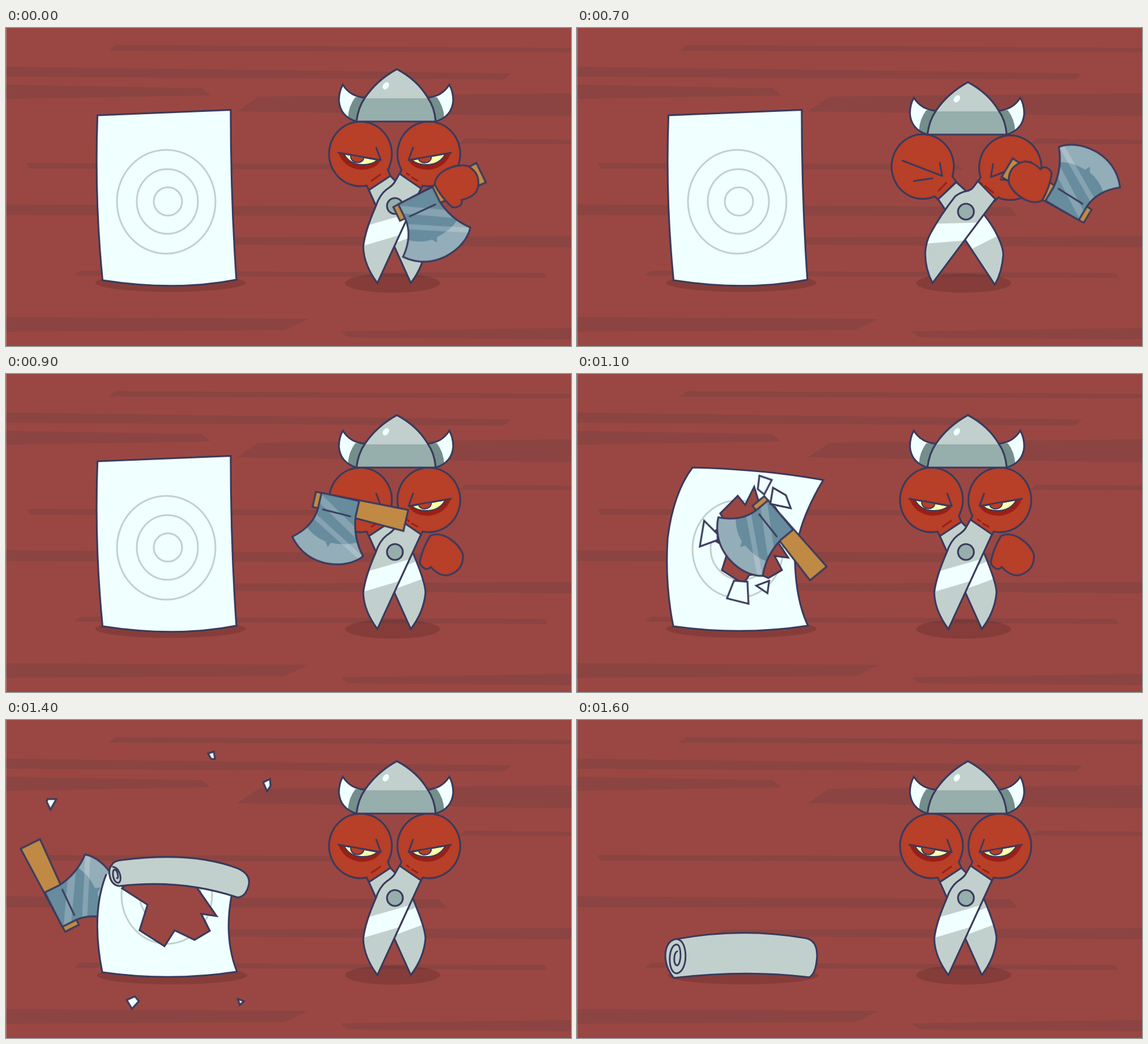
An HTML page without scripts for the animation above (2600 ms loop, 998x561 px).

```html
<!DOCTYPE html>
<html lang="en">
<head>
<meta charset="utf-8">
<title>Axe throw</title>
<style>
html, body { margin: 0; width: 100%; height: 100%; overflow: hidden; background: #9a4743; }
svg.stage { display: block; width: 100vw; height: 100vh; }

.ink { stroke: #3a3a5c; stroke-width: 3.2; }
.thin { stroke: #3a3a5c; stroke-width: 2.2; }
.line { fill: none; stroke: #3a3a5c; stroke-width: 3; stroke-linecap: round; stroke-linejoin: round; }
.freckle { fill: none; stroke: #9a1f16; stroke-width: 3; }
.red { fill: #b83f28; }
.steel { fill: #c1d0cd; }
.dull { fill: #96aeac; }
.paper { fill: #f0ffff; }
.wood { fill: #c08a45; }
.floor { fill: #9a4743; }
.stripe { fill: #8b4442; }
.shadow { fill: #000; opacity: .13; }
.rings { fill: none; stroke: #c1d0cd; stroke-width: 3; }

.anim { animation: 2.6s step-end infinite; }

/* Fighter */
.calm { animation-name: calm; }
.strain { animation-name: strain; visibility: hidden; }
.helmet { animation-name: helmet; }
@keyframes calm {
  0% { visibility: visible; } 23.07% { visibility: hidden; } 34.61% { visibility: visible; }
}
@keyframes strain {
  0% { visibility: hidden; } 23.07% { visibility: visible; } 34.61% { visibility: hidden; }
}
@keyframes helmet {
  0% { transform: none; } 23.07% { transform: translateY(23px); } 34.61% { transform: none; }
}

/* Weapon */
.axe { animation-name: axe; }
.glove { animation-name: glove; }
.axe-out { animation-name: axe-out; visibility: hidden; }
@keyframes axe {
  0% { transform: translate(690px, 328px) rotate(-26deg); visibility: visible; }
  23.07% { transform: translate(894px, 331px) rotate(-150.3deg); }
  26.92% { transform: translate(902px, 332px) rotate(-149deg); }
  30.76% { transform: translate(690.5px, 210.5px) rotate(52.3deg); }
  34.61% { transform: translate(544.5px, 221px) rotate(13deg); }
  38.46% { transform: translate(470px, 325px) rotate(-137deg); }
  42.3% { transform: translate(320.5px, 224px) rotate(50.4deg); }
  50%, 100% { visibility: hidden; }
}
@keyframes glove {
  0% { transform: translate(690px, 328px) rotate(-26deg); visibility: visible; }
  23.07% { transform: translate(894px, 331px) rotate(-150.3deg); }
  26.92% { transform: translate(902px, 332px) rotate(-149deg); }
  30.76% { transform: translate(690.5px, 210.5px) rotate(52.3deg); }
  34.61% { transform: translate(670px, 255px) rotate(33deg); visibility: visible; }
  46.15%, 100% { visibility: hidden; transform: translate(670px, 255px) rotate(33deg); }
}
@keyframes axe-out {
  0% { visibility: hidden; }
  50% { visibility: visible; transform: translate(150px, 311px) rotate(-35deg); }
  53.84% { visibility: visible; transform: translate(116.5px, 367.5px) rotate(-116.3deg); }
  57.69% { visibility: visible; transform: translate(20px, 175px) rotate(78deg); }
  61.53%, 100% { visibility: hidden; }
}

/* Paper */
.whole { animation-name: whole; }
.torn { animation-name: torn; visibility: hidden; }
.curl1 { animation-name: curl1; visibility: hidden; }
.curl2 { animation-name: curl2; visibility: hidden; }
.curl3 { animation-name: curl3; visibility: hidden; }
.rolled { animation-name: rolled; visibility: hidden; }
.paper-shadow { animation-name: paper-shadow; }
@keyframes whole { 0% { visibility: visible; } 42.3%, 100% { visibility: hidden; } }
@keyframes torn { 0% { visibility: hidden; } 42.3% { visibility: visible; } 50% { visibility: hidden; } }
@keyframes curl1 { 0% { visibility: hidden; } 50% { visibility: visible; } 53.84% { visibility: hidden; } }
@keyframes curl2 { 0% { visibility: hidden; } 53.84% { visibility: visible; } 57.69% { visibility: hidden; } }
@keyframes curl3 { 0% { visibility: hidden; } 57.69% { visibility: visible; } 61.53% { visibility: hidden; } }
@keyframes rolled { 0% { visibility: hidden; } 61.53%, 100% { visibility: visible; } }
@keyframes paper-shadow { 0% { transform: none; } 53.84%, 100% { transform: translate(3px, 1px); } }

/* Shards: --x, --y and --r give travel and turn */
.shard {
  animation-name: fly; visibility: hidden; vector-effect: non-scaling-stroke;
  transform-box: fill-box; transform-origin: center;
}
@keyframes fly {
  0% { visibility: hidden; }
  42.3% { visibility: visible; transform: translate(calc(var(--x) * -.15), calc(var(--y) * -.15)) scale(.95); }
  46.15% { visibility: visible; transform: none; }
  50% { visibility: visible; transform: translate(calc(var(--x) * .6), calc(var(--y) * .6)) rotate(calc(var(--r) * .5)) scale(.7); }
  53.84% { visibility: visible; transform: translate(var(--x), var(--y)) rotate(var(--r)) scale(.44); }
  57.69% { visibility: visible; transform: translate(calc(var(--x) * 1.3), calc(var(--y) * 1.3)) rotate(calc(var(--r) * 1.3)) scale(.25); }
  61.53%, 100% { visibility: hidden; }
}
</style>
</head>
<body>
<svg class="stage" viewBox="0 0 998 561" preserveAspectRatio="none">
<defs>
  <path id="blade" d="M10-14L78-15V13Q82 50 106.500 78.500C85 108 15 122-23 73Q8 48 10 15Z"/>
  <clipPath id="in-blade"><use href="#blade"/></clipPath>
  <g id="axe">
    <path class="wood ink" d="M0-13.5L166-19V19L0 13.5Z"/>
    <g clip-path="url(#in-blade)">
      <use href="#blade" fill="#94aeb9"/>
      <path fill="#668c9d" d="M-12 40Q8 64 36 68L42 77L46 68Q74 68 92 56L84-20H0Z"/>
      <path fill="none" stroke="#fff" stroke-opacity=".2" stroke-width="13" d="M-10-16L110 57"/>
      <path fill="none" stroke="#fff" stroke-opacity=".2" stroke-width="9" d="M-10 19L110 86"/>
    </g>
    <use href="#blade" class="ink" fill="none"/>
    <path class="line" d="M19 14L69 15"/>
  </g>

  <g id="horn">
    <path class="paper" d="M595 100Q588 112 588 128Q590 156 619 165L634 123Q608 121 595 100Z"/>
    <path fill="#748e8b" d="M617 122Q605 138 604 158L619 165L634 123Z"/>
    <path class="ink" fill="none" d="M595 100Q588 112 588 128Q590 156 619 165L634 123Q608 121 595 100Z"/>
  </g>

  <g id="calm-head">
    <path class="red ink" d="M674.500 250A55.5 57 0 1 0 637 278L641 286L679 261Z"/>
    <path fill="#9a1f16" d="M587 220L662 233Q654 250 626 250Q597 247 587 220Z"/>
    <path fill="#ffffae" class="thin" d="M597 222L656 233Q645 242 628 241Q606 240 597 222Z"/>
    <path class="line" d="M587 220L662 233L654 211"/>
  </g>
  <g id="strain-head">
    <path class="red ink" d="M663 262A55 57 0 1 0 632 297L638 303L670 271Z"/>
    <path class="line" d="M575 234L645 261L641 238M595 270L628 265"/>
  </g>

  <path id="calm-back" d="M641 286L679 261L690 272L719 316C730 342 741 370 741 386Q738 420 715 450Z"/>
  <path id="calm-front" d="M695 257L733 283L656 450Q632 418 631 386Q634 358 653 315Q660 294 672 285Q684 277 687 271Z"/>
  <path id="strain-back" d="M638 302L670 272L690 290L718 328C740 355 753 385 753 400Q751 430 738 453Z"/>
  <path id="strain-front" d="M708 270L739 302L628 450Q615 425 615 397Q616 378 624 363Q642 330 668 297Q677 290 687 288Q695 287 700 281Z"/>
  <clipPath id="in-cb"><use href="#calm-back"/></clipPath>
  <clipPath id="in-cf"><use href="#calm-front"/></clipPath>
  <clipPath id="in-sb"><use href="#strain-back"/></clipPath>
  <clipPath id="in-sf"><use href="#strain-front"/></clipPath>

  <path id="bent" class="paper ink" d="M204 165Q330 168 435 187Q388 265 385 330Q387 400 408 444Q290 462 170 445Q155 370 160 290Q170 210 204 165Z"/>
  <g id="bent-rings" class="rings">
    <ellipse cx="284" cy="309" rx="80" ry="86"/>
    <ellipse cx="290" cy="308" rx="54" ry="55"/>
  </g>
  <path id="hole" class="floor ink" d="M205 297L250 326L236 371L280 399L298 371L333 388L360 372L345 342L372 346L338 297L345 245L313 215L292 236L262 226L240 262Z"/>
  <g id="curled">
    <path class="paper ink" d="M181 263Q148 335 170 445Q290 462 408 444Q385 385 398 312L400 263Z"/>
    <use href="#bent-rings"/>
    <use href="#hole"/>
  </g>
  <g id="curl">
    <path class="steel ink" d="M186 257Q190 248 205 247Q330 231 410 262Q432 272 429 290Q424 312 409 313Q310 280 200 293Q186 291 183 274Q181 262 186 257Z"/>
    <path class="line" d="M189 259C202 261 206 284 199 287C190 289 186 268 191 264C197 262 200 281 196 279"/>
  </g>
  <clipPath id="below1"><rect y="205" width="998" height="356"/></clipPath>
  <clipPath id="below2"><rect y="272" width="998" height="289"/></clipPath>
  <clipPath id="below3"><rect y="362" width="998" height="199"/></clipPath>
</defs>

<rect class="floor" width="998" height="561"/>
<path class="stripe" d="M194 30L998 35V43L180 40Z
  M0 68L893 80L880 91L0 86Z
  M0 100L346 106L361 119L0 125Z
  M446 121L998 115V156L408 147Z
  M812 195L998 197V205L800 204Z
  M36 238L672 240L682 250L42 248Z
  M0 311L765 316L779 332L0 330Z
  M258 370L998 367V387L240 381Z
  M130 428L950 432L957 441L120 437Z
  M0 510L534 513L492 533L0 536Z
  M590 535L998 529V549L605 546Z"/>
<rect width="1" height="561" fill="#fff" opacity=".3"/>

<ellipse class="shadow anim paper-shadow" cx="290.5" cy="449.5" rx="133" ry="16"/>
<ellipse class="shadow" cx="683" cy="450" rx="84" ry="17"/>

<use href="#axe" class="anim axe-out"/>

<g class="anim whole">
  <path class="paper ink" d="M161.500 154L397 144.500Q397 300 407 444Q300 465 170.500 445Q156 300 161.500 154Z"/>
  <g class="rings">
    <ellipse cx="283" cy="306.500" rx="87" ry="91.500"/>
    <ellipse cx="285" cy="306" rx="54" ry="57"/>
    <circle cx="286" cy="306" r="25"/>
  </g>
</g>
<g class="anim torn">
  <use href="#bent"/>
  <use href="#bent-rings"/>
  <path class="floor ink" d="M313 199L320 222L350 235L365 260L385 290L355 297L373 324L349 321L362 346L338 360L320 352L304 355L294 370L256 346L268 308L230 286L264 264L253 246L284 215L297 231Z"/>
</g>
<g class="anim curl1">
  <g clip-path="url(#below1)"><use href="#bent"/><use href="#bent-rings"/><use href="#hole"/></g>
  <use href="#curl" y="-64"/>
</g>
<g class="anim curl2">
  <g clip-path="url(#below2)"><use href="#curled"/></g>
  <use href="#curl"/>
</g>
<g class="anim curl3">
  <g clip-path="url(#below3)"><use href="#curled"/></g>
  <use href="#curl" x="-14" y="90"/>
</g>
<g class="anim rolled">
  <path class="steel ink" d="M172 387Q290 365 405 385Q425 390 424 418Q422 448 410 454Q300 440 171 455Q156 437 156 415Q157 392 172 387Z"/>
  <path class="line" d="M177 408C170 412 170 433 177 433C185 430 185 396 176 396C160 397 159 448 177 447C197 442 196 390 178 387"/>
</g>

<g class="anim calm">
  <use href="#calm-head"/>
  <use href="#calm-head" transform="matrix(-1 0 0 1 1373 0)"/>
  <path class="red thin" d="M609 224C607 241 632 241 632 228ZM729 230C729 241 753 241 751 226Z"/>
  <path class="freckle" d="M645 270L662 258M707 256L713 260M716 263L728 270"/>
  <use href="#calm-back" class="steel"/>
  <path class="paper" clip-path="url(#in-cb)" d="M680 382L745 358L735 326L690 345Z"/>
  <use href="#calm-back" class="ink" fill="none"/>
  <use href="#calm-front" class="steel"/>
  <path class="paper" clip-path="url(#in-cf)" d="M625 352L730 322V355L625 386Z"/>
  <use href="#calm-front" class="ink" fill="none"/>
  <circle class="dull ink" cx="687" cy="314" r="14"/>
</g>
<g class="anim strain">
  <use href="#strain-head"/>
  <use href="#strain-head" transform="matrix(-1 0 0 1 1376 2)"/>
  <path class="freckle" d="M638 288L653 272M711 272L717 277M720 278L736 291"/>
  <use href="#strain-back" class="steel"/>
  <path class="paper" clip-path="url(#in-sb)" d="M680 370L697 390L760 358L722 322Z"/>
  <use href="#strain-back" class="ink" fill="none"/>
  <use href="#strain-front" class="steel"/>
  <path class="paper" clip-path="url(#in-sf)" d="M610 346L720 343V372L610 381Z"/>
  <use href="#strain-front" class="ink" fill="none"/>
  <circle class="dull ink" cx="687" cy="324" r="14"/>
</g>
<g class="anim helmet">
  <use href="#horn"/>
  <use href="#horn" transform="matrix(-1 0 0 1 1378 0)"/>
  <path class="dull" d="M619 165Q622 140 634 123H745Q757 140 759 165Z"/>
  <path class="steel" d="M633 124Q655 92 690 72Q727 92 746 124Z"/>
  <path class="ink" fill="none" stroke-linejoin="round" d="M619 165Q622 140 634 123Q655 92 690.500 72.500Q727 92 745 123Q757 140 759 165Z"/>
  <ellipse class="paper" cx="671" cy="102" rx="5" ry="7" transform="rotate(35 671 102)"/>
</g>

<use href="#axe" class="anim axe"/>
<path class="red ink anim glove" d="M83-17Q90-30 110-32Q135-33 150-21Q161-5 156 9Q151 24 140 28Q128 32 114 28Q112 37 104 36Q93 36 91 26Q84 8 83-17Z"/>

<g class="paper ink">
  <path class="anim shard" style="--x:29px;--y:-116px;--r:-38deg" d="M326 161L349 169L335 196L323 186Z"/>
  <path class="anim shard" style="--x:90px;--y:-91px;--r:55deg" d="M359 186L383 200L392 224L354 216Z"/>
  <path class="anim shard" style="--x:-134px;--y:-117px;--r:200deg" d="M204 240L229 265V276L196 288Z"/>
  <path class="anim shard" style="--x:-53px;--y:97px;--r:45deg" d="M269 378L294 380L296 421L256 411Z"/>
  <path class="anim shard" style="--x:74px;--y:105px;--r:40deg" d="M327 389L351 380L348 403Z"/>
</g>
</svg>
</body>
</html>
```
